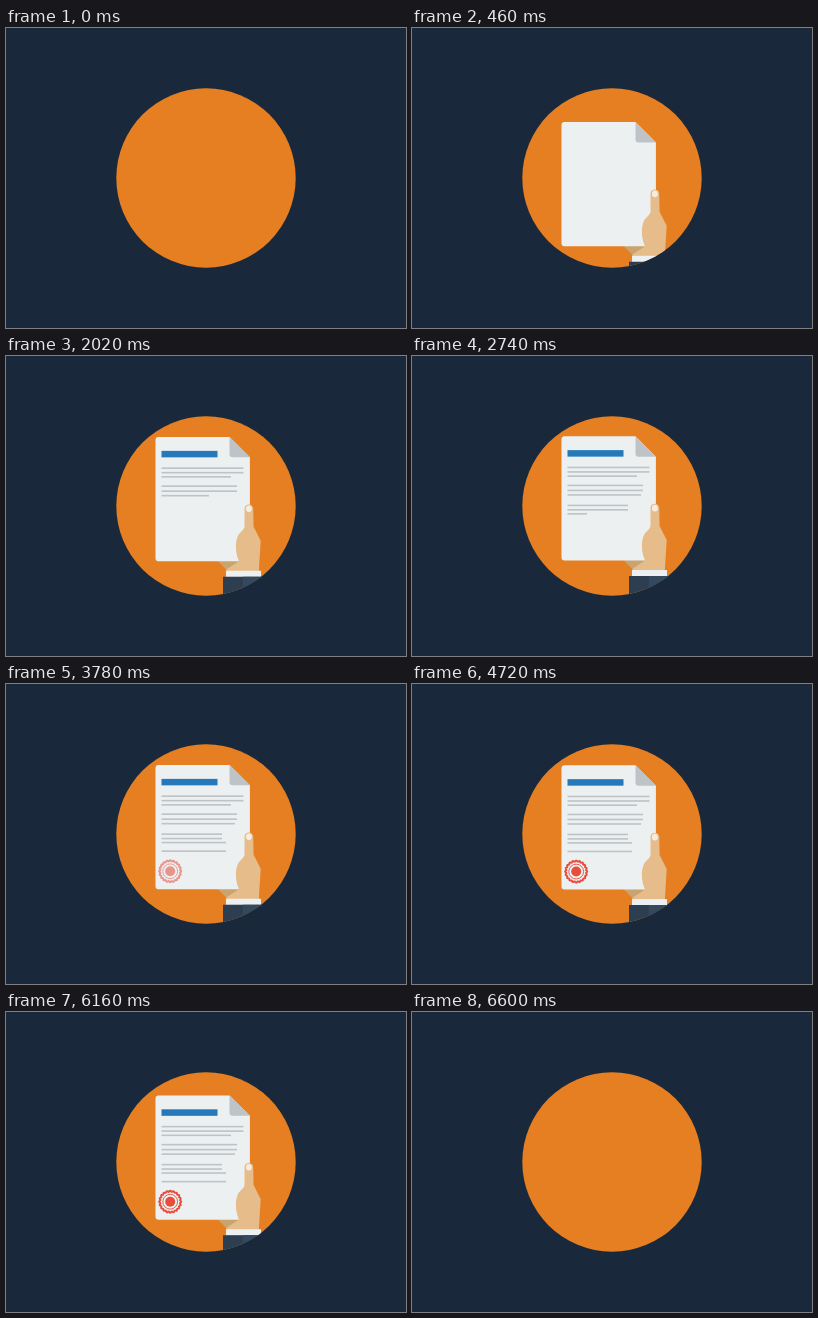
An HTML page for the animation above (7200 ms loop, 400 px wide and 300 px high).

```html
<!DOCTYPE html>
<html lang="en">
<head>
<meta charset="utf-8">
<title>Signed document</title>
<style>
  html, body { margin: 0; width: 100%; height: 100%; overflow: hidden; background: #19293b; }
  svg { display: block; width: 400px; height: 300px; }
</style>
</head>
<body>
<svg viewBox="0 0 400 300">
  <clipPath id="disc"><circle cx="200" cy="150" r="89.7"/></clipPath>
  <circle cx="200" cy="150" r="89.7" fill="#e67e22"/>
  <g clip-path="url(#disc)">
    <g id="sheet">
      <path fill="#c9a46f" d="M211 204H235V216L220.500 213.800Z"/>
      <path fill="#ecf0f1" d="M152.500 80.800H223.500L243.900 101.200V202.100Q243.900 205.100 240.900 205.100H152.500Q149.500 205.100 149.500 202.100V83.800Q149.500 80.800 152.500 80.800Z"/>
      <path fill="#bdc3c7" d="M223.500 80.800L243.900 101.200H226.500Q223.500 101.200 223.500 98.200Z"/>
      <rect id="title" x="155.500" y="94.700" width="56" height="6.500" fill="#2579bb"/>
      <g id="lines" fill="#bdc3c7"></g>
      <g id="stamp" fill="none" stroke="#e74c3c">
        <path id="rim" stroke-width="1.900"/>
        <circle r="7.400" stroke-width="0.900"/>
        <circle r="5" fill="#e74c3c" stroke="none"/>
      </g>
      <path fill="#e6bc8a" d="M238.500 152.300C238.500 147 247 147 247.200 152.300L247.600 170.500L254.700 184.500L252.800 215.500H220.500V213.200L233 205C229.300 197 228.800 186 232 179.500C234 175.500 238.500 174 238.500 170Z"/>
      <ellipse cx="242.900" cy="152.700" rx="2.900" ry="3.300" fill="#f7ece0"/>
      <rect x="220" y="214.600" width="35" height="6.200" fill="#ecf0f1"/>
      <path fill="#2c3e50" d="M217 220.600H258V245H217Z"/>
      <path fill="#34495e" d="M237 220.600H258V245H237Z"/>
    </g>
  </g>
</svg>
<script>
const LOOP = 7200;
const $ = id => document.getElementById(id);
const clamp = x => Math.min(1, Math.max(0, x));
const progress = (t, start, length) => clamp((t - start) / length);
const easeOut = p => 1 - (1 - p) ** 3;
const easeIn = p => p ** 3;

// Text lines: y, full width, start of drawing, duration
const lines = [
  [112, 82, 820, 500], [116.5, 82, 935, 500], [120.7, 69.5, 1065, 500],
  [130, 75.5, 1450, 420], [135, 75.5, 1600, 420], [139.5, 73.5, 1750, 420],
  [150, 60.5, 2130, 400], [154.4, 60.5, 2320, 400], [158.4, 64.5, 2620, 400],
  [167, 64.5, 2950, 400]
].map(([y, width, start, length]) => {
  const el = document.createElementNS('http://www.w3.org/2000/svg', 'rect');
  el.setAttribute('x', 155.5);
  el.setAttribute('y', y - 0.8);
  el.setAttribute('height', 1.6);
  $('lines').append(el);
  return { el, width, start, length };
});

// Scalloped edge of the stamp
let rim = '';
for (let i = 0; i < 160; i++) {
  const a = i / 160 * Math.PI * 2;
  const r = 10.5 + 0.55 * Math.cos(a * 20);
  rim += (i ? 'L' : 'M') + (r * Math.cos(a)).toFixed(2) + ' ' + (r * Math.sin(a)).toFixed(2);
}
$('rim').setAttribute('d', rim + 'Z');
$('stamp').setAttribute('transform', 'translate(164.200 187.100)');

function draw(t) {
  const hidden = 1 - easeOut(progress(t, 100, 640)) + easeIn(progress(t, 6000, 600));
  const bob = 0.6 * Math.cos((t - 1400) / 3000 * Math.PI * 2);
  $('sheet').setAttribute('transform', `translate(0 ${162 * hidden + bob})`);
  $('title').setAttribute('width', 56 * progress(t, 500, 400));
  for (const { el, width, start, length } of lines) {
    el.setAttribute('width', width * progress(t, start, length));
  }
  $('stamp').setAttribute('opacity', progress(t, 3580, 360));
}

function frame() {
  draw(performance.now() % LOOP);
  requestAnimationFrame(frame);
}
frame();
</script>
</body>
</html>
```
